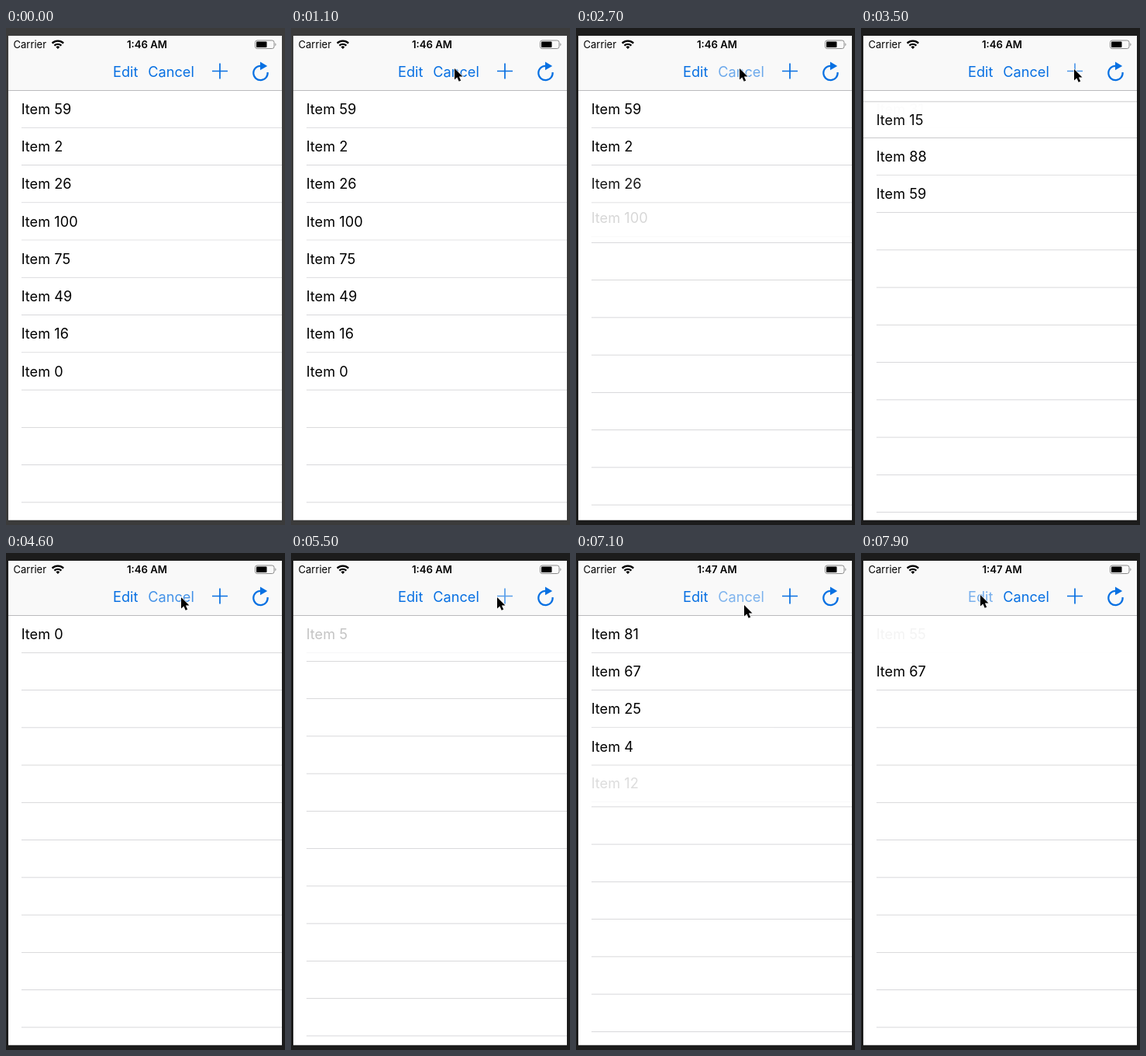
An HTML page that plays this animation: 360 by 640 pixels, repeating every 8000 ms.

```html
<!DOCTYPE html>
<html lang="en">
<head>
<meta charset="utf-8">
<title>List demo</title>
<style>
  html, body { margin: 0; width: 100%; height: 100%; overflow: hidden; background: #1c1c1c; }
  svg { display: block; width: 360px; height: 640px; }
  text { font-family: Inter, Roboto, sans-serif; font-size: 18.2px; white-space: pre; }
  .status { font-size: 13px; }
  .bold { font-size: 13.2px; font-weight: 600; text-anchor: middle; }
  .tint { fill: #0870e2; }
  .wire { fill: none; stroke: #0870e2; }
</style>
</head>
<body>
<svg viewBox="0 0 360 640">
  <defs><clipPath id="screen"><rect x="3" y="10" width="353" height="623.7"/></clipPath></defs>
  <rect id="frame" width="360" height="640"/>
  <g clip-path="url(#screen)">
    <rect x="3" y="10" width="353" height="624" fill="#fff"/>
    <g id="rows"></g>
    <g id="blanks"></g>
    <rect x="3" y="10" width="353" height="70" fill="#f9f9f9"/>
    <rect x="3" y="80" width="353" height="0.9" fill="#b4b4b6"/>
  </g>

  <text class="status" x="9.5" y="26">Carrier</text>
  <g fill="none" stroke="#000" stroke-width="2.2">
    <path d="M59.6 19.6A10.4 10.4 0 0 1 74.2 19.6"/>
    <path d="M62.4 22.6A6.4 6.4 0 0 1 71.4 22.6"/>
  </g>
  <path d="M66.9 27L64.5 24.5A3.5 3.5 0 0 1 69.3 24.5Z"/>
  <text class="bold" id="clock" x="182" y="26"></text>
  <rect x="321.5" y="16" width="24.5" height="10.5" rx="2.6" fill="none" stroke="#8a8a8a"/>
  <rect x="323" y="17.5" width="13.5" height="7.5" rx="1"/>
  <path d="M347.4 19.2Q349.6 21.2 347.4 23.3Z" fill="#8a8a8a"/>

  <text class="tint" id="edit" x="138" y="62.8">Edit</text>
  <text class="tint" id="cancel" x="183.2" y="62.8">Cancel</text>
  <path class="wire" id="plus" d="M266 55.5H286M276 45.5V65.5" stroke-width="1.7"/>
  <path class="wire" d="M328.5 48.8A9.2 9.2 0 1 0 337.6 57" stroke-width="2.2"/>
  <path class="tint" d="M328 43.4L337.2 48.9L328 54.2Z"/>

  <path id="cursor" d="M0 0V14.5L3.4 11.4L5.7 16.8L8.2 15.8L5.9 10.5H10.5Z"
        stroke="#fff" stroke-width="1.2" paint-order="stroke"/>
</svg>
<script>
const LOOP = 8000, STEP = 100, SLIDE = 300, GLIDE = 150;
const TOP = 80.6, ROW = 48.25;
const EDIT_AT = 7864, EDITED = 81;
const $ = id => document.getElementById(id);

const items = [];
const presses = { plus: [], cancel: [], edit: [EDIT_AT] };

// Plus puts new rows on top
function push(from, gap, ...numbers) {
  numbers.forEach((n, i) => {
    const added = from + i * gap;
    items.push({ n, added, removed: Infinity });
    presses.plus.push(added);
  });
}

// Cancel drops the oldest row, at the bottom
function drop(from, gap, count) {
  for (let i = 0; i < count; i++) {
    const removed = from + i * gap;
    items.find(item => item.removed === Infinity).removed = removed;
    presses.cancel.push(removed);
  }
}

push(-LOOP, 0, 0, 16, 49, 75, 100, 26, 2, 59);
drop(1480, 0, 1);
drop(1965, 170, 6);
push(3072, 160, 88, 15, 31, 42, 0);
drop(3870, 105, 5);
drop(4640, 0, 1);
push(5407, 131, 5, 24, 12, 4, 25, 67);
push(6275, 0, 55);
drop(6450, 209, 5);

// Pointer moves: time of leaving, where to
const moves = [
  [100, 150, 52], [500, 325, 28], [800, 148, 52], [950, 211, 52], [2850, 275, 53],
  [3725, 226, 57], [4750, 266, 57], [6150, 217, 67], [7400, 154, 54]
];

const clamp = u => Math.max(0, Math.min(1, u));
const ease = u => (u = clamp(u), u * u * (3 - 2 * u));
const mix = (a, b, u) => a + (b - a) * u;

function add(parent, name, attrs) {
  const el = document.createElementNS("http://www.w3.org/2000/svg", name);
  for (const k in attrs) el.setAttribute(k, attrs[k]);
  return parent.appendChild(el);
}

const rule = (parent, y, x = 20, fill = "#cfcfd2") =>
  add(parent, "rect", { x, y, width: 356 - x, height: 0.8, fill });

// Newer rows sit underneath older ones
items.reverse();
for (const item of items) {
  const g = item.el = add($("rows"), "g", {});
  add(g, "rect", { x: 3, width: 353, height: ROW, fill: "#fff" });
  item.edge = rule(g, -0.4, 3, "#bcbcbf");
  rule(g, ROW - 0.9);
  item.label = add(g, "text", { x: 19.7, y: 30.3 });
  item.label.textContent = "Item " + item.n;
}
for (let k = 1; k < 13; k++) rule($("blanks"), k * ROW - 0.9);

function drawList(t) {
  let y = TOP, pushed = false;
  for (const { added, removed, el, edge } of items) {
    const live = t >= added && t < removed + SLIDE;
    el.style.display = live ? "" : "none";
    if (!live) continue;
    const grow = ease((t - added) / SLIDE);
    const size = grow * (1 - ease((t - removed) / SLIDE));
    el.setAttribute("transform", `translate(0 ${y.toFixed(2)})`);
    el.setAttribute("opacity", size.toFixed(3));
    edge.style.display = pushed ? "" : "none";
    pushed = grow < 1;
    y += size * ROW;
  }
  $("blanks").setAttribute("transform", `translate(0 ${y.toFixed(2)})`);

  // Editing reloads the top row with a fade
  const { n, el, label } = items[0];
  label.textContent = "Item " + (t < EDIT_AT ? EDITED : n);
  if (t >= EDIT_AT) el.setAttribute("opacity", ease((t - EDIT_AT) / SLIDE));
}

function drawButtons(t) {
  for (const id in presses) {
    const glow = presses[id].map(at => {
      const dt = t - at;
      return dt < -60 ? 1 : dt < 0 ? 0.75 : mix(0.5, 1, clamp((dt - 20) / 220));
    });
    $(id).setAttribute("opacity", Math.min(...glow));
  }
}

function drawCursor(t) {
  let x = 230, y = 291;
  for (const [leave, toX, toY] of moves) {
    const u = ease((t - leave) / GLIDE);
    x = mix(x, toX, u);
    y = mix(y, toY, u);
  }
  $("cursor").style.display = t < moves[0][0] ? "none" : "";
  $("cursor").setAttribute("transform", `translate(${x.toFixed(2)} ${y.toFixed(2)})`);
}

function draw(t) {
  $("frame").setAttribute("fill", t < 1300 ? "#3b3b3b" : "#1c1c1c");
  $("clock").textContent = t < 6000 ? "1:46 AM" : "1:47 AM";
  drawList(t);
  drawButtons(t);
  drawCursor(t);
}

const start = performance.now();
function tick() {
  const ms = (performance.now() - start) % LOOP;
  draw(Math.floor(ms / STEP) * STEP);
  requestAnimationFrame(tick);
}
tick();
</script>
</body>
</html>
```
